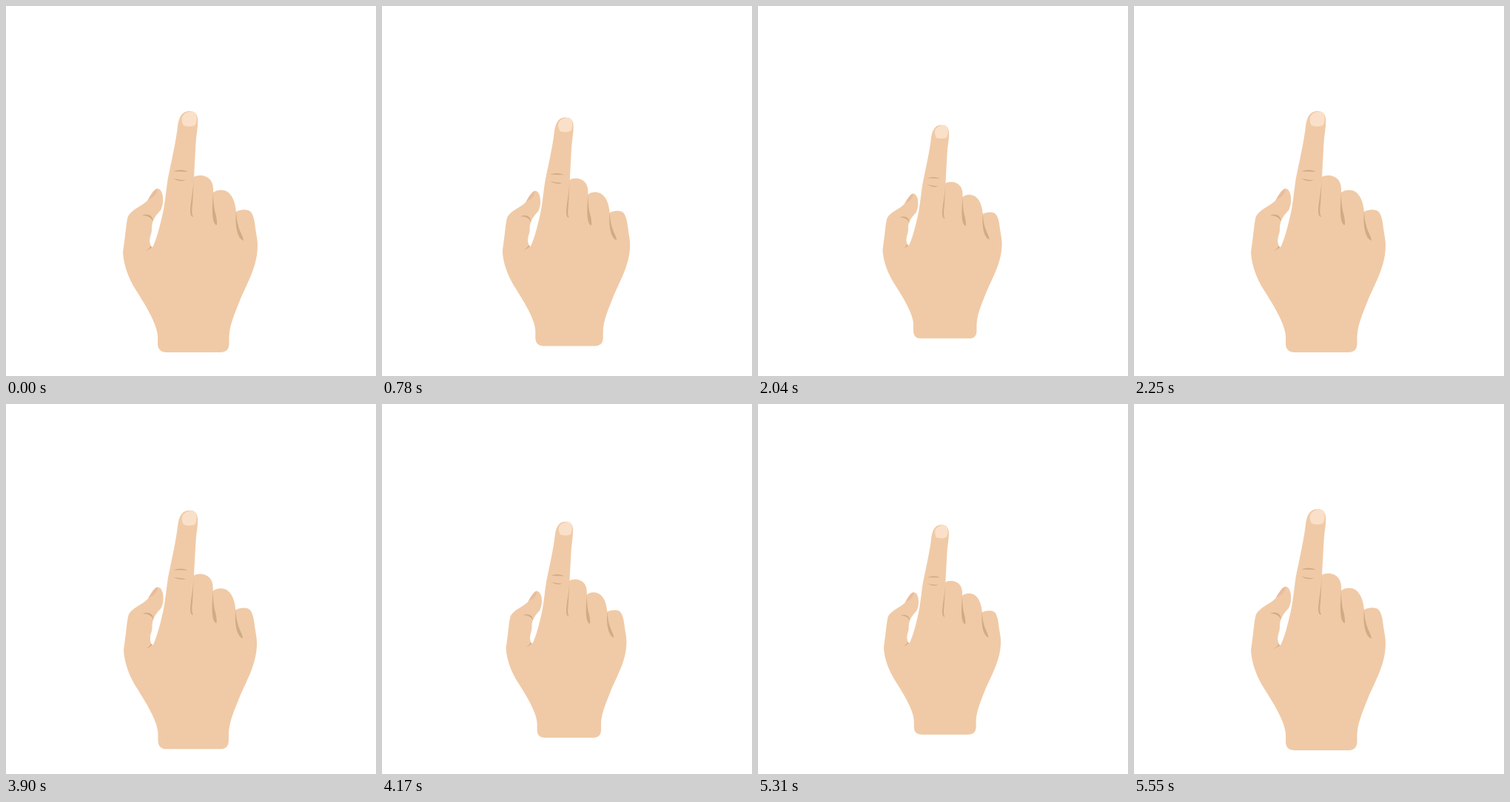
An HTML page that plays this animation: 500 by 500 pixels, repeating every 6.54 s.

```html
<!DOCTYPE html>
<html lang="en">
<head>
<meta charset="utf-8">
<title>Tapping hand</title>
<style>
html, body { margin: 0; width: 100%; height: 100%; overflow: hidden; background: #fff; }
svg { display: block; width: 100%; height: 100%; }
</style>
</head>
<body>
<svg viewBox="0 0 500 500">
  <g id="hand">
    <path fill="#f0caa6" d="M205 447V456Q205 468 217 468H289.500Q301.500 468 301.500 456V447
      C302 432 308 418 316 398C326 374 340 352 340 323
      C340 316 338 308 337 300C336 290 334 281 330 277.500C326 274.500 317 274.500 311 278
      C310 265 305 251 294 249C288 248 284 249 280 252
      C281 240 277 231 265 229C260 229 257 229 254 231
      L256.500 185C257 175 259.300 165 259.300 155C259 147 256 142 248 142
      C239 142 234 148 232 162C230 182 223 212 219 232
      C216 250 215 270 210 288C207 301 203 316 198 326
      C194 324 193 316 196 308C197 305 197 303 197 298
      C198 288 204 281 209 276C212 270 213 263 211.500 255
      C210 249 207 246 203 247C199 249 195 256 191 263
      C183 271 171 274 165 284C163 290 162 302 161 310
      L158 333C159 352 167 370 175 383C187 402 205 430 205 447Z"/>
    <path fill="#fae0c8" d="M238 150C242 142 254 140 257 146C258 152 258 158 255 161.500
      C250 163.500 244 163 240 161.500C238 158 237 154 238 150Z"/>
    <path fill="#e8bc9e" d="M192 262.500C195 256 200 249 204.500 247C205 250 203 254 200 257C197 260 194 260 192 262.500Z"/>
    <g fill="#cfac84">
      <path d="M226 223.500Q236 219.500 246 224Q236 223.500 226 223.500Z"/>
      <path d="M226 233Q234 235 243 235.500Q235 238.500 226 233Z"/>
      <path d="M254 231C253 250 249 268 249 277C249 283 251 285 253 285C251 281 251 276 252 268Z"/>
      <path d="M280 252C279 268 277 292 284 296C286 297 285 290 284 284C281 274 280 264 280 252Z"/>
      <path d="M311 278C309 298 313 315 321 317C320 308 312 302 311 278Z"/>
      <path d="M184 283C191 280 199 283 198.500 291C196 285 191 283.500 184 283Z"/>
      <path d="M188 331Q193 329 195.500 324.500L197 326Q193 330 188 331Z"/>
    </g>
  </g>
</svg>
<script>
const hand = document.getElementById('hand');
const LOOP = 6540, TICK = 30, SHRINK = 0.147;
const taps = [[660, 2010], [3900, 5310]];

// Linear progress in whole ticks, the first one landing at the start time
const ramp = (t, start, steps) =>
  Math.max(0, Math.min(1, (Math.floor((t - start) / TICK) + 1) / steps));

function draw() {
  const t = performance.now() % LOOP;
  let press = 0;
  for (const [down, up] of taps) press += ramp(t, down, 14) - ramp(t, up, 9);
  const s = 1 - SHRINK * press;
  hand.setAttribute('transform', `translate(249 305) scale(${s}) translate(-249 -305)`);
  requestAnimationFrame(draw);
}
draw();
</script>
</body>
</html>
```
